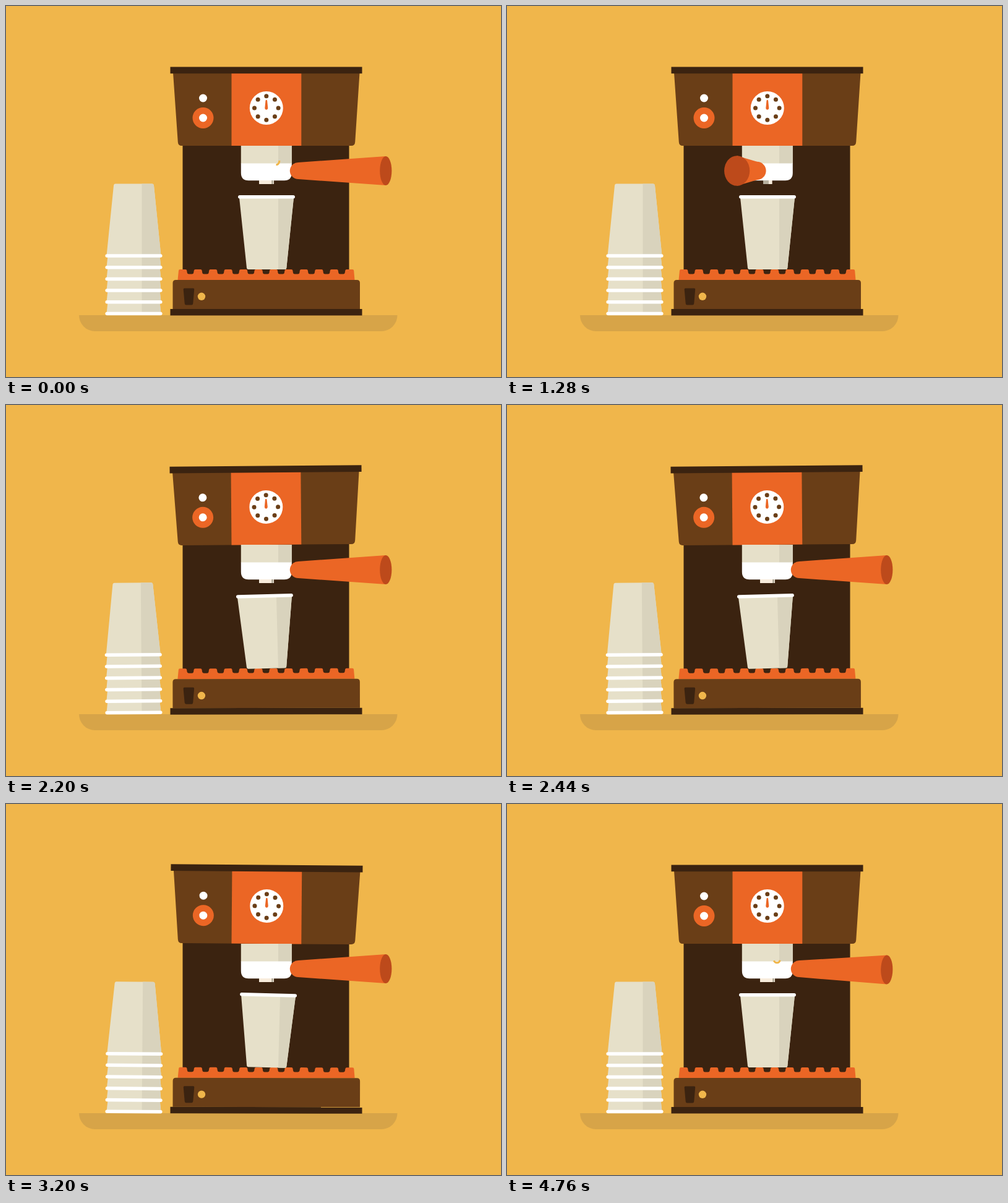
These frames come from a looping animation (800x600 px, 4.8 s). An HTML page:

```html
<!DOCTYPE html>
<html lang="en">
<head>
<meta charset="utf-8">
<title>Coffee machine</title>
<style>
  html, body { margin: 0; width: 100%; height: 100%; overflow: hidden; background: #f0b64b; }
  svg { display: block; width: 100vw; height: 100vh; }
  .dark { fill: #3b2310; }
  .brown { fill: #6a3e17; }
  .orange { fill: #eb6625; }
  .rust { fill: #bd4a1b; }
  .cream { fill: #e6e0c9; }
  .shade { fill: #d9d3bd; }
  .white { fill: #fff; }
  .rim { stroke: #fff; stroke-width: 5.5; stroke-linecap: round; }
  .steam { fill: none; stroke: #f0b64b; stroke-width: 3; visibility: hidden; }
  #pour { fill: none; stroke: #eb6625; stroke-width: 11; visibility: hidden; }
</style>
</head>
<body>
<svg viewBox="0 0 800 600">
  <path fill="#d7a448" d="M118 500H632.500A26 26 0 0 1 606.500 526H144A26 26 0 0 1 118 500Z"/>

  <g id="stack">
    <path class="cream" d="M177 287.500H236Q238.700 287.500 239 290.500L250.500 404H162.500L174 290.500Q174.300 287.500 177 287.500Z"/>
    <path class="shade" d="M219.500 287.500H236Q238.700 287.500 239 290.500L250.500 404H219.500Z"/>
    <g id="rims"></g>
  </g>

  <rect class="dark" x="285.500" y="220" width="269" height="220"/>

  <g id="base">
    <path class="orange" id="tray"/>
    <path class="brown" d="M269.500 490V448Q269.500 443 274.500 443H567Q572 443 572 448V490Z"/>
    <rect class="dark" x="265.500" y="490" width="310" height="10.500"/>
    <path class="dark" d="M288.500 456.500H302.500Q304.500 456.500 304.200 458.500L302.300 481Q302 483.500 300 483.500H291Q289 483.500 288.700 481L286.700 458.500Q286.500 456.500 288.500 456.500Z"/>
    <circle cx="316" cy="469.800" r="6.200" fill="#f0b64b"/>
  </g>

  <g id="head">
    <path class="brown" d="M270 108H571.500L564.200 220Q563.800 226 558 226H284Q278.200 226 277.800 220Z"/>
    <rect class="orange" x="364.500" y="108" width="112.800" height="118"/>
    <rect class="dark" x="265.500" y="98.500" width="310" height="10.700"/>
    <circle class="white" cx="318.500" cy="149" r="6.500"/>
    <circle class="orange" cx="318.500" cy="181" r="17"/>
    <circle class="white" cx="318.500" cy="181" r="6.500"/>
    <circle class="white" cx="420.800" cy="165" r="27"/>
    <g id="ticks"></g>
    <path class="orange" d="M419.500 153Q420.800 150.500 422.100 153L423.300 165Q423 167.800 420.800 167.800Q418.600 167.800 418.300 165Z"/>
  </g>

  <rect class="cream" x="379.800" y="226" width="82" height="29"/>
  <rect class="shade" x="440" y="226" width="21.800" height="29"/>
  <path class="white" d="M379.800 254.500H461.800V270Q461.800 282.200 449.600 282.200H392Q379.800 282.200 379.800 270Z"/>
  <rect id="spout" y="282" height="6" fill="#f8ecdc"/>
  <rect id="side" y="282" height="6" fill="#b8b09f"/>

  <path id="pour"/>
  <path class="steam" d="M396 308C395 296 388 290 391 279S398 263 398 253S392 240 394 228"/>
  <path class="steam" d="M406.500 306C402 298 401 290 402 278S411 254 404 234"/>
  <path class="steam" d="M443 307C440 295 448 280 449 262C450 246 443 238 436 239C429 240 428 247 431 253C434 259 441 258 442 250"/>

  <g id="cup">
    <path class="cream" d="M377 310H465L453.300 423.500Q453 426 451 426H391.500Q389.300 426 389 423.500Z"/>
    <path class="shade" d="M440 310H465L453.300 423.500Q453 426 451 426H440Z"/>
    <path class="rim" d="M377.800 308.800H464.200"/>
  </g>

  <g id="handle">
    <path class="orange" id="cone"/>
    <circle class="orange" id="tip" cy="266.500"/>
    <ellipse class="rust" id="cap" cy="266.500"/>
  </g>
</svg>
<script>
const LOOP = 4800, STEP = 40;
const $ = id => document.getElementById(id);
const set = (el, attrs) => { for (const k in attrs) el.setAttribute(k, attrs[k]); };
const clamp = v => Math.max(0, Math.min(1, v));
const ease = u => (1 - Math.cos(Math.PI * u)) / 2;
const steams = document.querySelectorAll('.steam');

function build() {
  let rims = '';
  for (let i = 0; i < 6; i++) {
    const y = 404 + i * 18.7;
    if (i < 5) {
      rims += `<path class="cream" d="M164.500 ${y}H248.500L250.500 ${y + 18.7}H162.500Z"/>` +
              `<path class="shade" d="M219.500 ${y}H248.500L250.500 ${y + 18.7}H219.500Z"/>`;
    }
    rims += `<path class="rim" d="M163.200 ${y}H249.800"/>`;
  }
  $('rims').innerHTML = rims;

  let ticks = '';
  for (let i = 0; i < 8; i++) {
    const a = i * Math.PI / 4;
    ticks += `<circle class="brown" r="3.500" cx="${420.8 + 19.3 * Math.cos(a)}" cy="${165 + 19.3 * Math.sin(a)}"/>`;
  }
  $('ticks').innerHTML = ticks;

  let d = 'M277.500 443L279 428Q279.200 426 281 426';
  for (let i = 0; i < 11; i++) {
    const x = 298 + i * 24.45;
    d += `H${x - 8}Q${x - 6} 426 ${x - 5.7} 428L${x - 5.3} 431Q${x - 5} 433.500 ${x - 2.5} 433.500` +
         `H${x + 2.5}Q${x + 5} 433.500 ${x + 5.3} 431L${x + 5.7} 428Q${x + 6} 426 ${x + 8} 426`;
  }
  $('tray').setAttribute('d', d + 'H560Q562 426 562.200 428L563.500 443Z');
}

// time, turn: 0 = right, 1 = front left
const turns = [[60, 0], [530, 1], [960, 0], [1316, 1], [1480, 1], [1880, 0]];

function turnAt(t) {
  const i = turns.findIndex(k => t < k[0]);
  if (i === 0 || i < 0) return 0;
  const [t0, a] = turns[i - 1], [t1, b] = turns[i];
  return a + (b - a) * ease((t - t0) / (t1 - t0));
}

function drawHandle(t) {
  const k = turnAt(t);
  const x = 613.8 - 248 * k, tip = 472.3 - 70 * k, r = 13.5 + 1.2 * k;
  const w = x > 415 ? 216 : 80;
  const rx = 24.5 * Math.sqrt(1 - ((x - 415) / w) ** 2), ry = 23.5 + 0.8 * k;
  set($('tip'), { cx: tip, r });
  set($('cap'), { cx: x, rx, ry });
  set($('cone'), { d: `M${tip} ${266.5 - r}L${x} ${266.5 - ry}V${266.5 + ry}L${tip} ${266.5 + r}Z` });

  const sag = 0.55 * ease(clamp((t - 3300) / 140));
  $('handle').setAttribute('transform', `rotate(${sag} 462 266)`);

  const left = 409 + 5.5 * k, right = 433 - 4.5 * k;
  set($('spout'), { x: left, width: right - left });
  set($('side'), k < 0.5
    ? { x: right - 4 + 4 * k, width: 3 * (1 - 2 * k) }
    : { x: left, width: 9 * (2 * k - 1) });
}

function drawShake(t) {
  const on = t >= 1920 && t < 3340;
  const s = on ? (Math.floor(t / STEP) % 2 ? -1 : 1) : 0;
  const tilt = (id, a, x, y) => $(id).setAttribute('transform', `rotate(${a * s} ${x} ${y})`);
  tilt('head', 0.45, 421, 226);
  tilt('base', 0.12, 421, 500);
  tilt('cup', 1.5, 421, 426);
  tilt('stack', 0.45, 207, 500);
}

function drawPour(t) {
  const top = 286 + 26 * clamp((t - 4260) / 100);
  const end = 286 + 28 * clamp((t - 3420) / 100);
  const on = t > 3420 && t < 4360;
  const sway = 3.5 * Math.cos((t - 3760) / 70);
  $('pour').style.visibility = on ? 'visible' : 'hidden';
  $('pour').setAttribute('d', `M421.500 ${top}Q${420.5 - sway} ${(top + end) / 2} 420.500 ${end}`);
}

function drawSteam(el, head, tail) {
  const len = el.getTotalLength();
  const a = len * clamp(tail), b = len * clamp(head);
  el.style.visibility = b - a > 0.2 ? 'visible' : 'hidden';
  el.style.strokeDasharray = `0 ${a} ${b - a} 999`;
}

function draw(t) {
  drawHandle(t);
  drawShake(t);
  drawPour(t);
  drawSteam(steams[0], (t - 3440) / 480, (t - 3600) / 480);
  drawSteam(steams[1], (t - 3580) / 480, (t - 3760) / 480);
  // the last wisp runs past the loop point
  const u = t < 400 ? t + LOOP : t;
  drawSteam(steams[2], (u - 3740) / 1050, clamp((u - 3900) / 960) ** 1.5);
}

build();
const start = performance.now();
function tick() {
  draw((performance.now() - start) % LOOP);
  requestAnimationFrame(tick);
}
tick();
</script>
</body>
</html>
```
